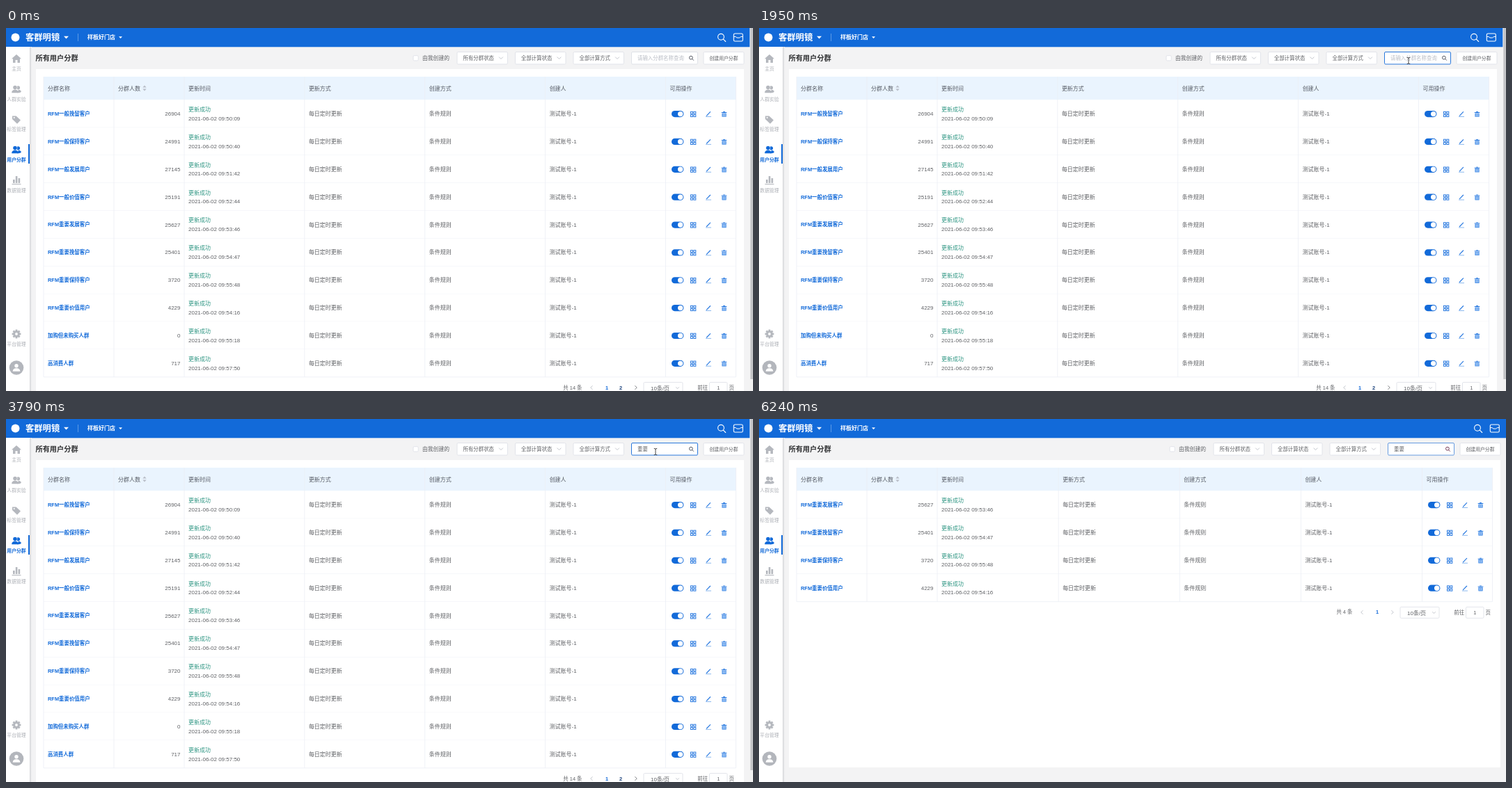
An HTML page that plays this animation: 1073x522 px, repeating every 6270 ms.

```html
<!DOCTYPE html>
<html lang="zh-CN">
<head>
<meta charset="utf-8">
<style>
html, body { margin: 0; width: 100%; height: 100%; overflow: hidden; background: #f3f3f4; }
svg { display: block; width: 1073px; height: 522px; }
text { font-family: "Liberation Sans", "Noto Sans CJK SC", "Noto Sans CJK", sans-serif; white-space: pre; }
</style>
</head>
<body>
<svg id="stage" viewBox="0 0 1073 522" xmlns="http://www.w3.org/2000/svg"></svg>
<script>
const LOOP = 6270;
const BLUE = '#126ad9', INK = '#606266', LINE = '#ebeef5', EDGE = '#dcdfe6', MUTED = '#b5b8be';
const TABLE_TOP = 103.3, ROW_H = 39.86;
const SMALL = 7.43, BODY = 8;

const segments = [
  ['RFM一般挽留客户', 26904, '09:50:09'],
  ['RFM一般保持客户', 24991, '09:50:40'],
  ['RFM一般发展用户', 27145, '09:51:42'],
  ['RFM一般价值客户', 25191, '09:52:44'],
  ['RFM重要发展客户', 25627, '09:53:46'],
  ['RFM重要挽留客户', 25401, '09:54:47'],
  ['RFM重要保持客户', 3720, '09:55:48'],
  ['RFM重要价值用户', 4229, '09:54:16'],
  ['加购但未购买人群', 0, '09:55:18'],
  ['高消费人群', 717, '09:57:50']
];

// start time, composed text, candidates
const typing = [
  [2310, 'z', '在 这 中 着 做 找 总'],
  [2390, 'zh', '这 中 着 找 只 张 真'],
  [2480, 'zho', '中 周 州 种 重 钟 忠'],
  [2590, 'zhon', '中 种 重 钟 忠 终 众'],
  [2700, 'zhong', '中 种 重 钟 忠 终 众'],
  [2860, "zhong'y", '重要 中央 中药 中医 中有 中业 中'],
  [2970, "zhong'ya", '中亚 重压 中压 种牙 中雅 种鸭 中'],
  [3110, "zhong'yao", '重要 中药 中要 种药 重药 终要 中']
];
const COMMIT = 3690, FILTERED = 3860, BLUR = 6140;

// time, x, y of the pointer
const enterPath = [[210, 962, 518], [500, 946, 300], [810, 938, 130], [960, 936, 88], [1110, 932, 54.5], [1300, 933, 47]];
const leavePath = [[4720, 933, 47], [4850, 947, 82], [5000, 988, 172], [5130, 1027, 266], [5270, 1053, 349], [5370, 1057, 412], [5750, 1067, 522]];

const attrs = o => Object.entries(o).map(([k, v]) => ` ${k}="${v}"`).join('');
const rect = (x, y, width, height, fill, more = {}) =>
  `<rect${attrs({ x, y, width, height, fill, ...more })}/>`;
const box = (x, y, w, h, stroke = EDGE) => rect(x, y, w, h, '#fff', { rx: 1.5, stroke, 'stroke-width': .8 });
const circle = (cx, cy, r, fill, more = {}) => `<circle${attrs({ cx, cy, r, fill, ...more })}/>`;
const fillPath = (d, fill) => `<path d="${d}" fill="${fill}"/>`;
const stroke = (d, color, w = .8) =>
  `<path d="${d}" fill="none" stroke="${color}" stroke-width="${w}" stroke-linecap="round" stroke-linejoin="round"/>`;
const text = (x, cy, str, size = BODY, fill = INK, more = {}) =>
  `<text${attrs({ x, y: cy + size * .37, 'font-size': size, fill, ...more })}>${str}</text>`;
const BOLD = { 'font-weight': 700 }, MIDDLE = { 'text-anchor': 'middle' }, END = { 'text-anchor': 'end' };
const at = (x, y, body) => `<g transform="translate(${x} ${y})">${body}</g>`;
const chevron = (x, y, dx, dy, color) =>
  stroke(dy ? `M${x - dx} ${y - dy / 2}l${dx} ${dy}l${dx} ${-dy}` : `M${x + dx / 2} ${y - 2.5}l${-dx} 2.5l${dx} 2.5`, color, .8);
const magnifier = (x, y, r, color, w) =>
  circle(x, y, r, 'none', { stroke: color, 'stroke-width': w }) +
  stroke(`M${x + r * .72} ${y + r * .72}l${r * .8} ${r * .8}`, color, w);

function people(color) {
  return circle(2.5, -2.2, 2.6, color) + fillPath('M1 5.3Q8 5.5 6.5 2.6Q5.5 .8 3 .8Z', color) +
    circle(-2, -2.4, 3.3, '#fff') + circle(-2, -2.4, 2.8, color) +
    fillPath('M-6.8 5.3Q-6.9 .8-2 .8Q3 .8 2.8 5.3Z', color);
}

function gear() {
  let teeth = '';
  for (let a = 0; a < 180; a += 45) teeth += rect(-1.4, -6.4, 2.8, 12.8, MUTED, { transform: `rotate(${a})` });
  return teeth + circle(0, 0, 4.8, MUTED) + circle(0, 0, 1.9, '#fff');
}

function sidebar() {
  const item = (y, icon, label, active) =>
    at(15, y, icon) + text(15, y + 14, label, 6.87, active ? BLUE : '#aeb1b7', { ...MIDDLE, ...(active ? BOLD : {}) });
  const home = fillPath('M0-6L7 .3H5V6H1.5V2H-1.5V6H-5V.3H-7Z', MUTED);
  const tag = fillPath('M-6-5H-.5L6 1L1 6.2L-6-.5Z', MUTED) + circle(-3.3, -2.5, 1.1, '#fff');
  const bars = rect(-5, -1, 2.6, 5, MUTED) + rect(-1.2, -6, 2.6, 10, MUTED) + rect(2.6, -3, 2.6, 7, MUTED) +
    rect(-6.5, 5, 13, 1.1, MUTED);
  return rect(34, 27, 3, 495, 'url(#shade)') + rect(0, 27, 34, 495, '#fff') +
    item(44, home, '主页') + item(88, people(MUTED), '人群实验') + item(131.5, tag, '标签管理') +
    item(175, people(BLUE), '用户分群', true) + item(219, bars, '数据管理') + item(440, gear(), '平台管理') +
    rect(32, 167, 2, 28, BLUE) +
    circle(15, 488.5, 10.3, '#b3b6bc') + circle(15, 485.8, 2.7, '#fff') +
    fillPath('M9.7 493.8Q9.7 489.2 15 489.2Q20.3 489.2 20.3 493.8Z', '#fff');
}

function topBar(shift) {
  return rect(0, 0, 1073, 27.3, BLUE) + circle(13.5, 13.5, 6, '#fff') +
    text(28, 13.5, '客群明镜', 12.3, '#fff', BOLD) + fillPath('M83 11.7h7l-3.5 3.8z', '#fff') +
    rect(103, 8, .8, 11, '#6fa5e8') +
    text(117, 13.5, '样板好门店', BODY, '#fff', BOLD) + fillPath('M162 12.2h5l-2.5 2.7z', '#fff') +
    at(shift, 0, magnifier(1027, 12.8, 4.4, '#fff', 1.1) +
      rect(1045.3, 8, 13, 11, 'none', { rx: 1.8, stroke: '#fff', 'stroke-width': 1.1 }) +
      stroke('M1045.5 12.2Q1049 12.2 1050 14H1053.6Q1054.6 12.2 1058 12.2', '#fff', 1));
}

function filters() {
  const select = (x, label) => box(x, 34.5, 72.5, 17.5) + text(x + 8.5, 43.3, label, SMALL) + chevron(x + 63, 43.2, 2.6, 2.6, '#b4b8c0');
  return box(585, 39.7, 7.2, 7.2) + text(598, 43.3, '由我创建的', 7.8) +
    select(648, '所有分群状态') + select(731.5, '全部计算状态') + select(815, '全部计算方式') +
    box(1002, 34.5, 58, 17.5) + text(1031, 43.3, '创建用户分群', 6.87, INK, MIDDLE);
}

function rowActions(x, y) {
  const ICON = '#2c7be0';
  let grid = '';
  for (const dx of [-3.6, .8]) for (const dy of [-3.6, .8])
    grid += rect(dx, dy, 2.9, 2.9, 'none', { stroke: ICON, 'stroke-width': 1 });
  const pencil = stroke('M-2.6 2.2L2.6-3.2', ICON, 1.2) + stroke('M-3.6 3.6H3.6', '#6fa8ea', .8);
  const bin = rect(-3.2, -1.6, 6.4, 5.4, '#5a9aea', { rx: .6 }) + rect(-3.8, -3, 7.6, 1, ICON) + rect(-1.4, -4, 2.8, 1, ICON) +
    rect(-1.6, -.8, .8, 3.6, '#d5e6fa') + rect(.8, -.8, .8, 3.6, '#d5e6fa');
  return at(x, y, rect(8.5, -4.6, 17.4, 9.2, BLUE, { rx: 4.6 }) + circle(21.2, 0, 3.7, '#fff') +
    at(39.6, .3, grid) + at(61.5, .3, pencil) + at(84, .4, bin));
}

function pagination(total, pages, y, shift) {
  const first = 863 + (pages < 2 ? 20 : 0);
  return at(shift, y,
    text(first - 35.5, -.7, `共 ${total} 条`, SMALL, INK, END) + chevron(first - 22, -.4, 2.6, 0, '#b4b8c0') +
    text(first, -.6, '1', SMALL, BLUE, { ...BOLD, ...MIDDLE }) +
    (pages > 1 ? text(883, -.6, '2', SMALL, '#21477f', { ...BOLD, ...MIDDLE }) : '') +
    stroke('M903.7-2.9l2.5 2.5l-2.5 2.5', pages > 1 ? INK : '#b4b8c0') +
    box(916, -8, 56, 16) + text(926, .2, '10条/页', BODY) + chevron(964.5, .2, 2, 2, '#b4b8c0') +
    text(993.3, .2, '前往', SMALL) + box(1010.5, -8, 25.5, 16) + text(1023.2, .2, '1', SMALL, INK, MIDDLE) +
    text(1038.5, .2, '页', SMALL));
}

function page(rows, total, pages, shift, bottom) {
  const right = 1048.5 + shift, opsX = 947.5 + shift, flex = (opsX - 256) / 4;
  const cols = [54, 155, 256, 256 + flex, 256 + flex * 2, 256 + flex * 3, opsX];
  const tableEnd = TABLE_TOP + rows.length * ROW_H;
  let out = rect(43, 59, 1017 + shift, bottom - 59, '#fff') + rect(54, 70, right - 54, 33.3, '#eaf4fe');
  ['分群名称', '分群人数', '更新时间', '更新方式', '创建方式', '创建人', '可用操作'].forEach((label, i) =>
    out += text(cols[i] + 6, 86.7, label, BODY, '#565b64'));
  out += fillPath('M196.3 85.6h5.4l-2.7-3zM196.3 87.6h5.4l-2.7 3z', '#b9bec8');
  rows.forEach(([name, count, time], i) => {
    const top = TABLE_TOP + i * ROW_H, y = top + 19.9;
    out += rect(54, top, right - 54, ROW_H, '#fff', { class: 'row' }) +
      text(60, y, name, SMALL, BLUE, BOLD) + text(250.5, y, count, BODY, INK, END) +
      text(262, y - 6.2, '更新成功', BODY, '#2f9683') + text(262, y + 6.6, '2021-06-02 ' + time) +
      text(cols[3] + 6, y, '每日定时更新') + text(cols[4] + 6, y, '条件规则') +
      text(cols[5] + 6, y, '测试账号-1') + rowActions(opsX, y + .4) +
      rect(54, top + ROW_H - .4, right - 54, .8, LINE);
  });
  [...cols, right].forEach(x => out += rect(x - .4, 70, .8, tableEnd - 70, LINE));
  out += pagination(total, pages, tableEnd + 15.6, shift) + text(42.5, 43.3, '所有用户分群', 10.2, '#303133', BOLD) +
    at(shift, 0, filters()) + topBar(shift);
  if (!shift) out += rect(1068.3, 0, 4.7, 522, '#f1f1f1') + rect(1069.3, 0, 3.7, 505, '#c3c4c7');
  return out;
}

function mix(a, b, k) {
  const part = (hex, i) => parseInt(hex.slice(i, i + 2), 16);
  return `rgb(${[1, 3, 5].map(i => Math.round(part(a, i) + (part(b, i) - part(a, i)) * k))})`;
}
const clamp = v => Math.max(0, Math.min(1, v));

function follow(path, t) {
  let i = 1;
  while (i < path.length - 1 && t > path[i][0]) i++;
  const [t0, x0, y0] = path[i - 1], [t1, x1, y1] = path[i], k = clamp((t - t0) / (t1 - t0));
  return { x: x0 + (x1 - x0) * k, y: y0 + (y1 - y0) * k };
}
function pointerAt(t) {
  if (t < 210 || t >= 5750) return null;
  return follow(t < 4000 ? enterPath : leavePath, t);
}

function candidates(list) {
  const items = list.split(' '), wide = items[0].length > 1;
  const left = wide ? 699 : 770, step = wide ? 44.4 : 34, ctl = wide ? 1000 : 1010;
  let out = rect(left, 48.3, ctl + 64 - left, 24.7, '#f3f3f3', { stroke: '#d4d4d4', 'stroke-width': .7 }) +
    rect(left, 48.3, step, 24.2, '#2b83a5');
  items.forEach((word, i) => {
    const x = left + 7 + i * step;
    out += text(x, 60.5, i + 1, 10.3, '#222') + text(x + 10.3, 60.5, word, 10.6, '#111');
  });
  return out + rect(ctl - .4, 48.6, .8, 24, '#dcdcdc') + rect(ctl + 37, 48.6, .8, 24, '#dcdcdc') +
    stroke(`M${ctl + 9.5} 57.5l-3 3l3 3`, '#a5a5a5', .9) + stroke(`M${ctl + 27} 57.5l3 3l-3 3`, '#333', .9) +
    circle(ctl + 50, 60.5, 4.3, 'none', { stroke: '#333', 'stroke-width': .9 }) +
    circle(ctl + 48.5, 59.3, .6, '#333') + circle(ctl + 51.5, 59.3, .6, '#333') +
    stroke(`M${ctl + 47.8} 61.8q2.2 2.2 4.4 0`, '#333', .7);
}

function field(t, shift, typed, hovered) {
  const focus = t < BLUR ? clamp((t - 1450) / 120) : 1 - clamp((t - BLUR) / 300);
  const value = t >= COMMIT ? '重要' : typed ? typed[1] : '';
  const x = 898.5 + shift;
  const caretOn = [[1480, 1950], [2310, COMMIT], [FILTERED, 4200], [4750, 5300], [5750, BLUR]].some(([a, b]) => t >= a && t < b);
  return rect(x, 34.5, 95, 17.5, '#fff', { rx: 1.5, stroke: mix(hovered ? '#c0c4cc' : EDGE, BLUE, focus), 'stroke-width': .9 }) +
    (value ? text(x + 8.5, 43.3, value, SMALL, INK, { id: 'value' }) : text(x + 8.5, 43.3, '请输入分群名称查询', SMALL, '#b9bdc5')) +
    (caretOn ? rect(x + 8.8, 39, .8, 9, '#333', { id: 'caret' }) : '') +
    magnifier(x + 85.4, 42.7, 2.4, shift ? '#6a2d4c' : '#444a55', .9);
}

function pointer({ x, y }, inField) {
  if (inField) return at(x, y, stroke('M-1.8-4.6Q0-4.6 0-3.6Q0-4.6 1.8-4.6M0-3.6V3.6M-1.8 4.6Q0 4.6 0 3.6Q0 4.6 1.8 4.6', '#333', .9));
  return at(x, y, '<path d="M0 0V9.3L2.1 7.4L3.6 10.7L5 10.1L3.6 6.9H6.5Z" fill="#fff" stroke="#222" stroke-width=".8" stroke-linejoin="round"/>');
}

const stage = document.getElementById('stage');
stage.innerHTML =
  `<defs><linearGradient id="shade"><stop stop-color="#d3d4d7"/><stop offset="1" stop-color="#f3f3f4"/></linearGradient></defs>
  ${rect(0, 0, 1073, 522, '#f3f3f4')}
  <g id="all">${page(segments, 14, 2, 0, 522)}</g>
  <g id="found">${page(segments.slice(4, 8), 4, 1, 5, 501)}</g>
  ${sidebar()}<g id="live"></g>`;
const [all, found, live] = ['all', 'found', 'live'].map(id => document.getElementById(id));
const rowsOf = new Map([all, found].map(g => [g, [...g.querySelectorAll('.row')]]));

function render(t) {
  const filtered = t >= FILTERED, shift = filtered ? 5 : 0;
  all.style.display = filtered ? 'none' : '';
  found.style.display = filtered ? '' : 'none';

  const p = pointerAt(t);
  const inTable = p && p.x > 54 && p.x < 1048.5 + shift;
  const hoverRow = inTable ? Math.floor((p.y - TABLE_TOP) / ROW_H) : -1;
  rowsOf.get(filtered ? found : all).forEach((r, i) => r.setAttribute('fill', i === hoverRow ? '#fafcfe' : '#fff'));

  const inField = p && p.y > 34 && p.y < 52.5 && p.x > 898 + shift && p.x < 994 + shift;
  const typed = t < COMMIT ? typing.filter(k => t >= k[0]).pop() : null;
  live.innerHTML = field(t, shift, typed, inField) + (typed ? candidates(typed[2]) : '') + (p ? pointer(p, inField) : '');

  const value = document.getElementById('value'), caret = document.getElementById('caret');
  if (value && caret) caret.setAttribute('x', 907.2 + shift + value.getComputedTextLength());
}

const start = performance.now();
function tick() {
  render((performance.now() - start) % LOOP);
  requestAnimationFrame(tick);
}
render(0);
requestAnimationFrame(tick);
</script>
</body>
</html>
```
